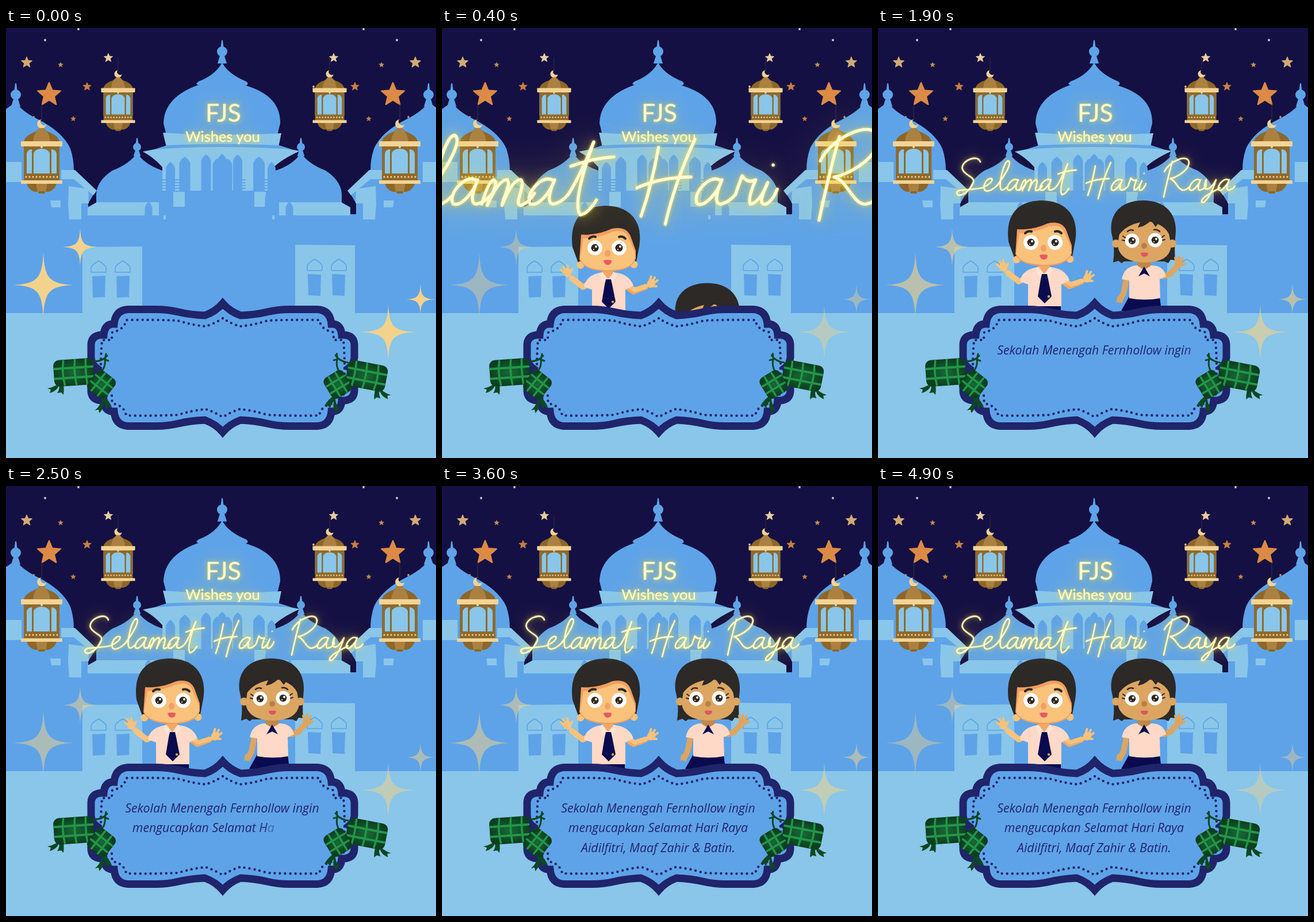
An HTML page that plays this animation: 748 by 748 pixels, repeating every 5 s.

```html
<!DOCTYPE html>
<html lang="ms">
<head>
<meta charset="utf-8">
<title>Selamat Hari Raya</title>
<style>
  html, body { margin: 0; width: 100%; height: 100%; overflow: hidden; background: #151043; }
  svg { display: block; width: 100vw; height: 100vh; }
  .neon { filter: drop-shadow(0 0 1.2px #f2dc4c) drop-shadow(0 0 5px #f2dc4c90) drop-shadow(0 0 15px #f2dc4c58); }
  .sign { font-family: Lato, sans-serif; fill: #fffbd2; text-anchor: middle; }
  .note { font: italic 500 21.3px "Open Sans", sans-serif; fill: #24256d; text-anchor: middle; }
</style>
</head>
<body>
<script>
const SKY = '#151043', BLUE = '#5ea3e8', LIGHT = '#89c6e9', NAVY = '#20246a';
const LOOP = 5000, STEP = 100;

const path = (d, fill, more = '') => `<path d="${d}" fill="${fill}" ${more}/>`;
const line = (d, stroke, width) => path(d, 'none', `stroke="${stroke}" stroke-width="${width}" stroke-linecap="round" stroke-linejoin="round"`);
const dot = (x, y, r, fill) => `<circle cx="${x}" cy="${y}" r="${r}" fill="${fill}"/>`;
const oval = (x, y, rx, ry, fill) => `<ellipse cx="${x}" cy="${y}" rx="${rx}" ry="${ry}" fill="${fill}"/>`;
const box = (x, y, w, h, fill, r = 0) => `<rect x="${x}" y="${y}" width="${w}" height="${h}" rx="${r}" fill="${fill}"/>`;
const group = (s, transform = '') => `<g transform="${transform}">${s}</g>`;
const both = (s, sum, dy = 0) => s + group(s, `translate(${sum} ${dy}) scale(-1 1)`);

function star(x, y, r, fill) {
  let pts = '';
  for (let i = 0; i < 10; i++) {
    const a = i * Math.PI / 5, q = i % 2 ? r * .45 : r;
    pts += `${x + q * Math.sin(a)},${y - q * Math.cos(a)} `;
  }
  return `<polygon points="${pts}" fill="${fill}" stroke="${fill}" stroke-width="${r * .1}" stroke-linejoin="round"/>`;
}

const stars = both([
  [36, 60, 10, '#d3aa72'], [178, 52, 8, '#e9cf9f'], [95, 64, 4.5, '#c98f50'], [141, 102, 7.5, '#c9803f'],
  [75, 116, 21, '#dc8a45'], [48, 155, 2.5, '#d8a563'], [117, 158, 4.5, '#c98245'], [213, 102, 2.5, '#e8c88f'],
  [126, 2, 2.5, '#e8e4ee'], [68, 21, 2.5, '#e8e4ee']
].map(s => star(...s)).join(''), 748);

// Mosque
const arch = (x, w, top, bottom, fill = BLUE) =>
  path(`M${x - w / 2} ${bottom}V${top + 13}Q${x - w / 2} ${top + 6} ${x} ${top}Q${x + w / 2} ${top + 6} ${x + w / 2} ${top + 13}V${bottom}Z`, fill);
const finial = (x, y, r) => dot(x, y, r, BLUE) +
  path(`M${x - 1} ${y - r * 2.2}h2l1.5 ${r * 1.4}h-5ZM${x - r * .4} ${y + r * .7}h${r * .8}l${r * .5} ${r * 1.6}h${-r * 1.8}Z`, BLUE);

const outer = both(
  finial(17, 116, 9) +
  path('M0 141L17 129Q27 144 52 157Q99 180 112 210Q118 228 118 248L152 290L143 305V326H0Z', BLUE) +
  path('M0 233H27V268H0ZM96 247H120L158 283L152 291L118 263H96Z', LIGHT) +
  path('M109 275L143 280L144 305H131V333H110L108 306ZM77 300H95V312H79Z', LIGHT), 752);

const inner = both(
  finial(228, 207, 7) +
  path('M157 306V288Q159 265 185 248Q216 236 228 217Q240 237 272 248V306Z', BLUE) +
  path('M142 312L158 303H278V333H274V326H142Z', LIGHT) +
  arch(248, 13, 302, 326), 741);

const casement = x => line(`M${x - 13} 425V417Q${x - 12} 412 ${x} 405Q${x + 12} 412 ${x + 13} 417V425Z`, BLUE, 1.6) +
  path(`M${x - 11} 432L${x + 12} 431L${x + 11} 468L${x - 10} 469Z`, BLUE);
const wings = both(path('M133 381L237 380V500H133Z', LIGHT) + casement(161) + casement(203), 740, -3);

let hall = finial(376, 41, 9) +
  path('M376 60Q386 80 418 93Q424 98 417 100Q478 118 477 166L472 186H279L274 166Q275 120 335 99Q328 98 335 93Q364 82 376 60Z', BLUE) +
  path('M238 215Q290 203 375 204Q460 203 511 214Q480 228 466 242V284H272V242Q258 226 238 215Z', LIGHT) +
  path('M273 182Q375 190 479 183L474 207H279Z', LIGHT) +
  path('M280 204Q375 199 475 204L497 211Q375 203 258 211Z', BLUE) +
  box(266, 283, 209, 43, BLUE) +
  [[286, 16, 233], [311, 19, 224], [348, 17, 220], [367, 15, 227], [376, 16, 219], [386, 15, 227], [403, 16, 220], [440, 20, 224], [462, 14, 233]]
    .map(([x, w, y]) => arch(x, w, y, 284)).join('');
for (let y = 264; y < 284; y += 5)
  hall += line(`M273 ${y}H305M396 ${y}H416M446 ${y}H464`, BLUE, 2) + line(`M322 ${y + 2}H338M418 ${y + 2}H430`, LIGHT, 1.5);
hall += path('M291 285H311V311H291ZM432 285H452V311H432Z', LIGHT) + arch(284, 13, 284, 315) + arch(457, 13, 284, 315);

const mosque = box(0, 324, 748, 172, BLUE) + box(0, 496, 748, 252, LIGHT) + outer + inner + wings + hall;

// Lantern, hung at x = 0
let lamp = line('M0 132V160', '#3b3040', 1) +
  path('M-1 159A8 8 0 1 0 8 168A6.5 6.5 0 0 1 -1 159Z', '#f4d394') +
  path('M-4 174H4Q8 180 17 183Q30 189 31 198H-31Q-30 189 -17 183Q-8 180 -4 174Z', '#8d6729') +
  path('M-3 174H3Q14 182 15 198H-15Q-14 182 -3 174Z', '#ab8142') +
  box(-31, 205, 62, 50, LIGHT) +
  path('M-31 205H31V255H26V218Q24 211 17 211V255H14V218Q11 210 0 210Q-11 210 -14 218V255H-17V211Q-24 211 -26 218V255H-31Z', '#8f6a2c') +
  box(-31, 253, 62, 13, '#8f6a2c') +
  path('M-26 270H26Q24 281 12 285H-12Q-24 281 -26 270Z', '#8d6729') +
  path('M-10 270H10L7 285H-7Z', '#ab8142') + box(-6, 284, 12, 4, '#8d6729', 2) +
  box(-36, 197, 72, 9, '#f4d394', 1) + box(-36, 265, 72, 6, '#f4d394', 1) + dot(0, 207, 2, '#f4d394');
for (let x = -27; x <= 27; x += 6) lamp += dot(x, 259, 1.5, '#f4d394');
const small = 'translate(0 -57) scale(.82)';
const lamps = [62, 685].map(x => group(lamp, `translate(${x} 0)`)).join('') +
  [195, 563].map(x => group(lamp, `translate(${x} 0) ${small}`)).join('');

const glintShape = path('M0-1C.04-.2 .2-.04 1 0C.2.04 .04.2 0 1C-.04.2-.2.04-1 0C-.2-.04-.04-.2 0-1Z', '#f3d28c');
const sparkles = [[65, 447, 52, 57], [129, 381, 31, 33], [721, 472, 25, 27], [665, 529, 47, 48]]
  .map(([x, y, w, h]) => group(glintShape, `translate(${x} ${y}) scale(${w} ${h})`)).join('');

// Children
const eye = (x, y, r) => dot(x, y, r, '#fff') + dot(x, y, r * .5, '#33291f') + dot(x + 2, y - 2, 2, '#fff') + dot(x - 2, y + 3, 1, '#fff');
const hand = (x, y, turn, skin) => group(oval(0, 0, 7, 8, skin) + line('M-5 -2L-8 -9M-1 -5L-2 -12M3 -4L5 -11M5 2L10 -2', skin, 4), `translate(${x} ${y}) rotate(${turn})`);

const SKIN = '#fbc27c', TAN = '#dca562', SHIRT = '#ffd9c7', HAIR = '#2c2927', DARK = '#0a0a4f';
const boy =
  line('M254 437L245 441L226 426', SKIN, 10) + hand(218, 416, -25, SKIN) +
  line('M322 441L333 449L354 441', '#f3a766', 10) + line('M324 439L335 446L354 440', SKIN, 8) + hand(364, 435, 40, SKIN) +
  box(261, 480, 57, 12, DARK) +
  path('M276 416H301Q326 419 333 439L319 446V484H261V446L247 441Q250 421 276 416Z', SHIRT) +
  path('M278 410H299L297 424L289 430L280 424Z', '#f3a766') +
  path('M274 419L279 415L289 428L299 415L304 421L295 434L289 428L281 434Z', '#ffe4d6') +
  path('M285 428H294L296 437L302 467L290 479L278 467L283 437Z', DARK) + dot(297, 467, 2.2, '#d9a640') +
  path('M227 372C221 325 243 300 286 300C329 301 350 329 343 371L337 402H238Z', HAIR) +
  dot(241, 403, 6.5, SKIN) + dot(334, 402, 6.5, SKIN) +
  path('M242 350Q269 352 295 340Q320 334 328 353L337 378V392Q330 414 288 414Q246 413 239 393Z', '#f39d60') +
  path('M246 357Q272 356 298 345Q319 340 325 357L336 382V391Q329 412 288 412Q247 411 240 392Z', SKIN) +
  eye(266, 373, 13) + eye(308, 373, 13) +
  line('M256 357Q261 352 267 354M308 354Q314 352 319 357', HAIR, 4) +
  oval(288, 383, 5, 6, '#f2a066') + path('M281 395Q288 393 295 395Q295 403 288 403Q282 402 281 395Z', '#e65a68');

const girl =
  path('M409 408Q413 382 406 356C402 322 424 300 461 300C502 300 519 325 518 355Q515 381 517 404L509 403L505 409L498 406H428L424 409L418 405Z', HAIR) +
  line('M432 438L427 462L421 473', TAN, 10) + path('M416 467L427 468L424 480L419 473L414 479Z', TAN) +
  line('M496 432L508 428L519 416', TAN, 10) + hand(523, 410, 12, TAN) +
  path('M437 467H490L493 492H423Z', DARK) +
  path('M448 413H478Q497 414 501 432L490 437L491 470Q464 475 437 470V439L424 437Q428 416 448 413Z', SHIRT) +
  path('M451 405H475L474 414L463 421L452 414Z', '#c1874b') +
  path('M463 415L473 432L463 427L453 432Z', DARK) +
  dot(414, 375, 7, TAN) + dot(512, 375, 7, TAN) +
  path('M420 356Q440 338 460 336Q492 336 506 357L510 379Q507 408 463 408Q421 407 417 379Z', TAN) +
  path('M415 365Q422 329 452 319Q484 317 510 365Q505 349 489 338L483 346L475 335Q463 346 452 347L456 338Q432 343 420 359Z', HAIR) +
  eye(442, 370, 12.5) + eye(482, 369, 12.5) +
  line('M430 365L426 362M429 370L425 369M494 364L498 361M495 369L499 368', HAIR, 2) +
  line('M434 354Q438 350 444 352M480 351Q486 350 490 354', HAIR, 2.5) +
  oval(463, 379, 5, 5, '#b97f48') + path('M457 391Q463 390 470 391Q470 398 463 398Q457 397 457 391Z', '#dc5860');

// Frame: one quarter as quadratic points, mirrored into a closed outline
const quarter = [[0, -112], [-12, -98], [-31, -91], [-56, -92], [-77, -97], [-96, -101.5], [-116, -101.5], [-140, -101.5], [-165, -101.5],
  [-187, -100], [-189, -76], [-191, -76], [-193, -76], [-206, -74], [-207, -57], [-210, -57], [-213, -57], [-228, -55], [-229, -41],
  [-229, -30], [-229, -18], [-228, -6], [-220, 0]];
const beads = [[0, -86], [-16, -76], [-30, -72], [-52, -74], [-78, -82], [-120, -84], [-168, -83], [-171, -66], [-192, -62], [-193, -55],
  [-193, -48], [-202, -49], [-210, -48], [-212, -24], [-212, 0]];
function outline(pts) {
  const flip = (x, y) => pts.map(p => [p[0] * x, p[1] * y]);
  const sides = [pts, flip(1, -1).reverse(), flip(-1, -1), flip(-1, 1).reverse()];
  return 'M' + pts[0] + sides.map(s => s.slice(1).map((p, i) => (i % 2 ? ' ' : 'Q') + p).join('')).join('') + 'Z';
}
const plate = group(path(outline(quarter), BLUE, `stroke="${NAVY}" stroke-width="13"`) +
  path(outline(beads), 'none', `stroke="${NAVY}" stroke-width="4.4" stroke-linecap="round" stroke-dasharray="0 9"`), 'translate(377 591)');

// Woven rice cakes
const GREEN = '#22964a', LEAF = '#0d4823', WEAVE = 'url(#weave)';
const tails = path('M3 -4Q-4 6 -20 9L-14 11L-16 17Q-4 14 0 4Q2 10 -3 17L4 16L8 20Q10 6 6 -4Z', LEAF);
const ketupat =
  line('M153 580Q168 580 176 570M166 598Q174 588 172 575M170 576L178 579M172 577L174 567', LEAF, 3) +
  group(tails, 'translate(92 618)') +
  group(box(-35, -23, 70, 46, WEAVE, 10) + line('M-33 -8H33M-33 9H33', GREEN, 4) +
    line('M-17 -21Q-21 0 -17 21M3 -21Q0 0 3 21M22 -21Q20 0 22 21', GREEN, 3.5), 'translate(118 599) rotate(-4)') +
  group(tails, 'translate(167 647) rotate(-32)') +
  group(box(-20, -21, 40, 42, WEAVE, 9) + line('M-18 -7H18M-18 7H18M-7 -19V19M7 -19V19', GREEN, 3.5), 'translate(166 620) rotate(38)');
const cakes = `<radialGradient id="weave"><stop stop-color="#196a35"/><stop offset="1" stop-color="#0c3f20"/></radialGradient>` +
  group(ketupat) + group(ketupat, 'translate(743 0) scale(-1 1) rotate(-7 166 620)');

// Neon handwriting
const a = x => `M${x} 276m17-12c-8-4-21 12-16 18c6 2 15-9 18-18c-4 9-6 18-1 18q6-1 11-7`;
const script = 'M178 233C173 217 139 234 148 248C154 258 171 259 165 271C157 287 139 297 137 287C137 279 160 283 181 278' +
  'Q201 269 198 262C190 259 179 277 187 283Q195 286 208 273C222 254 233 235 227 231C219 231 209 272 214 281Q217 284 225 276' + a(225) +
  'M247 282Q252 265 256 264C260 267 252 279 251 283Q260 263 266 264C269 268 262 279 262 283Q270 263 276 264C280 268 270 283 276 283Q282 281 286 274' + a(282) +
  'Q319 263 330 236C321 260 315 284 320 290Q326 289 332 279M313 254Q329 248 345 247' +
  'M378 240Q373 268 365 291M405 234Q390 266 383 297M362 270Q380 262 402 262' + a(406) +
  'Q438 266 440 261Q444 267 450 264Q444 278 446 282Q453 281 459 266C453 279 453 283 458 282Q463 279 466 271M463 253v.1' +
  'M512 232Q503 265 497 294M498 250C507 231 541 217 541 235C539 250 516 261 508 262C518 264 522 283 532 282Q538 281 543 275' + a(542) +
  'Q570 270 571 264C562 282 575 289 588 264C581 287 569 307 563 303C561 295 583 285 595 278' + a(592);

const lines = ['Sekolah Menengah Fernhollow ingin', 'mengucapkan Selamat Hari Raya', 'Aidilfitri, Maaf Zahir & Batin.'];
const note = lines.map((s, i) => `<text class="note" x="376" y="${568 + 34.4 * i}">` +
  [...s].map(c => `<tspan>${c === '&' ? '&amp;' : c}</tspan>`).join('') + '</text>').join('');

document.body.innerHTML = `<svg viewBox="0 0 748 748" preserveAspectRatio="none">
  ${box(0, 0, 748, 748, SKY)}${stars}${mosque}${lamps}
  <g id="sparkles">${sparkles}</g>
  <g id="boy">${boy}</g><g id="girl">${girl}</g>
  ${plate}${cakes}
  <g class="neon sign"><text x="378" y="163" font-size="43">FJS</text><text x="377" y="198" font-size="25.5">Wishes you</text></g>
  <g id="greeting" role="img" aria-label="Selamat Hari Raya"><g class="neon">${line(script, '#fffbd2', 2.3)}</g></g>
  ${note}</svg>`;

const $ = id => document.getElementById(id);
const clamp = v => Math.max(0, Math.min(1, v));
const move = (id, v) => $(id).setAttribute('transform', v);
const rise = (t, start) => `translate(0 ${192 * (1 - clamp((t - start) / 630)) ** 3})`;

const glints = [[0, 1], [400, .42], [900, .75], [1900, .62], [2500, .52], [3600, .54], [4900, .42], [5000, .42]];
function glint(t) {
  const i = glints.findIndex(k => k[0] > t);
  const [[t0, v0], [t1, v1]] = [glints[i - 1], glints[i]];
  return v0 + (v1 - v0) * (t - t0) / (t1 - t0);
}

// Letters with their typing order; a line break takes one beat
const letters = [];
let beat = 0;
for (const row of document.querySelectorAll('.note')) {
  for (const el of row.children) letters.push({ el, start: 977 + 27.2 * beat++ });
  beat++;
}

function draw(now) {
  const t = Math.floor(now % LOOP / STEP) * STEP;
  $('sparkles').setAttribute('opacity', glint(t));
  move('boy', rise(t, 0));
  move('girl', rise(t, 342));
  const zoom = 1 + 4.8 * (1 - clamp(t / 700)) ** 1.5;
  move('greeting', `translate(379 264) scale(${zoom}) translate(-379 -264)`);
  $('greeting').setAttribute('opacity', clamp(t / 350));
  for (const { el, start } of letters) el.setAttribute('fill-opacity', clamp((t - start) / 60));
}

const begin = performance.now();
(function tick() {
  draw(performance.now() - begin);
  requestAnimationFrame(tick);
})();
</script>
</body>
</html>
```
